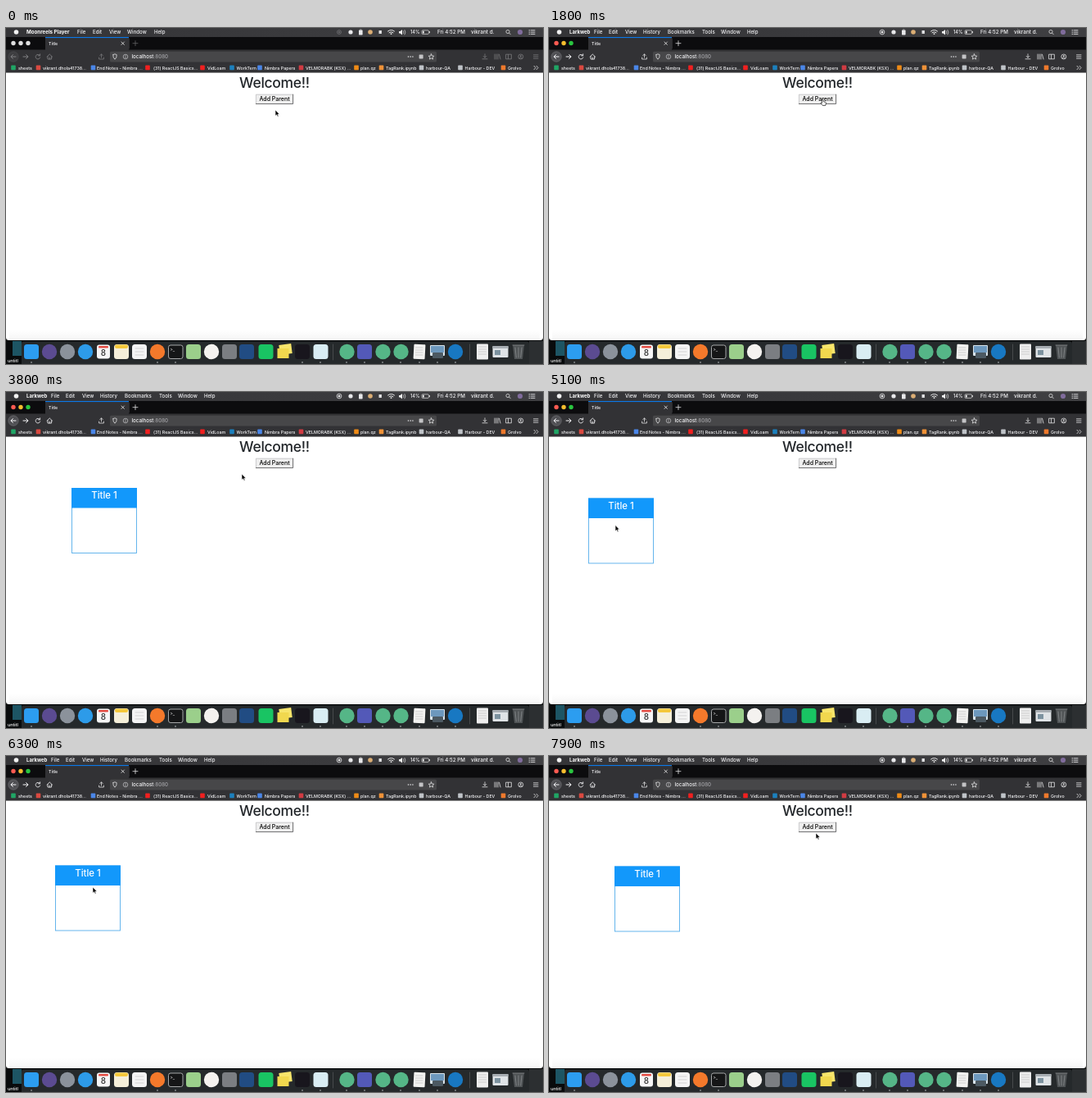
Recreate the animation shown at these times as an HTML page. Size 656x410 px, loop 8 s.

```html
<!DOCTYPE html>
<html lang="en">
<head>
<meta charset="utf-8">
<title>Title</title>
<style>
  html, body { margin: 0; width: 100%; height: 100%; overflow: hidden; background: #000; }
  svg { display: block; width: 100%; height: 100%; }
  text { font-family: Inter, "Open Sans", sans-serif; font-weight: 500; white-space: pre; }
</style>
</head>
<body>
<svg id="stage" viewBox="0 0 656 410"></svg>
<script>
const rect = (x, y, w, h, fill, r = 0, more = '') =>
  `<rect x="${x}" y="${y}" width="${w}" height="${h}" rx="${r}" fill="${fill}" ${more}/>`;
const circ = (x, y, r, fill, more = '') =>
  `<circle cx="${x}" cy="${y}" r="${r}" fill="${fill}" ${more}/>`;
const line = (d, color = '#e2e2e4', w = .8) =>
  `<path d="${d}" fill="none" stroke="${color}" stroke-width="${w}" stroke-linecap="round" stroke-linejoin="round"/>`;
const text = (x, y, s, size = 5.8, fill = '#f6f6f8', more = '') =>
  `<text x="${x}" y="${y}" font-size="${size}" fill="${fill}" ${more}>${s}</text>`;
const group = (id, body) => `<g id="${id}">${body}</g>`;
const fade = (id, from, to, dir) =>
  `<linearGradient id="${id}" ${dir}><stop stop-color="${from}"/><stop offset="1" stop-color="${to}"/></linearGradient>`;
const labels = list => list.map(([x, s]) => text(x, 7.2, s, 6.1)).join('');

const fades = fade('barFade', '#343437', '#3f3f42', 'x2="1"') +
  fade('pageFade', '#ffffff', '#f5f5f5', 'x2="0" y2="1"');

function menuBar() {
  const bold = 'style="font-weight:700"';
  return rect(0, 0, 656, 11, 'url(#barFade)') + circ(12.5, 5, 2.8, '#f2f2f2') +
    group('playerMenu', text(25, 7.2, 'Moonreels Player', 6.2, '#fff', bold) +
      labels([[87, 'File'], [106, 'Edit'], [126, 'View'], [148, 'Window'], [181, 'Help']]) +
      circ(407, 5, 2.4, 'none', 'stroke="#77777a" stroke-width=".8"') + circ(407, 5, .9, '#77777a')) +
    group('browserMenu', text(25, 7.2, 'Larkweb', 6, '#fff', bold) +
      labels([[55, 'File'], [73, 'Edit'], [93, 'View'], [115, 'History'], [145, 'Bookmarks'],
        [187, 'Tools'], [210, 'Window'], [242, 'Help']]) +
      circ(407, 5, 2.9, 'none', 'stroke="#e8e8ea" stroke-width=".8"') + rect(405.7, 3.7, 2.6, 2.6, '#e8e8ea', .3)) +
    circ(421, 5, 2.6, '#e8e8ea') +
    rect(431, 2.4, 4.6, 6, '#e8e8ea', .6) + rect(432, 1.6, 2.6, 1.5, '#aaa', .4) +
    circ(445, 5, 2.8, '#dcae74') + rect(455.5, 3, 3.4, 4, '#e0e0e2') +
    line('M466.5 4Q470.5 .8 474.5 4M468 5.7Q470.5 3.7 473 5.7', '#eee', 1) + circ(470.5, 7.2, .9, '#eee') +
    '<path d="M480 4H481.5L484 2V8.4L481.5 6.4H480Z" fill="#eee"/>' +
    line('M485.4 3.6Q486.5 5.2 485.4 6.8M487 2.4Q489 5.2 487 8', '#ddd', .7) +
    text(494, 7.2, '14%', 5.6) +
    rect(508, 2.8, 8.4, 4.6, 'none', 1, 'stroke="#ddd" stroke-width=".7"') +
    rect(509, 3.7, 1.7, 2.8, '#eee') + rect(517, 4, .9, 2.2, '#ddd') +
    text(527, 7.2, 'Fri 4:52 PM', 6.2) + text(568, 7.2, 'vikrant d.', 6.4) +
    circ(613, 4.5, 2.1, 'none', 'stroke="#ddd" stroke-width=".8"') + line('M614.6 6.1L616.3 7.8') +
    circ(628, 5, 3.1, '#806c9c') +
    line('M639 2.8H640M641.5 2.8H646M639 5.1H640M641.5 5.1H646M639 7.4H640M641.5 7.4H646', '#e6e6e8', .9);
}

function browser() {
  const lights = colors => colors.map((c, i) => circ(9 + 9 * i, 18.5, 2.7, c)).join('');
  let s = rect(0, 11, 656, 16, '#0c0c0e') + rect(0, 26.5, 656, 28, '#323235') +
    rect(48, 11.5, 102, 15.5, '#323235') + rect(48, 11, 102, 1.1, '#0a78e8') +
    group('idle', lights(['#dededf', '#dededf', '#dededf'])) +
    group('active', lights(['#ff5b52', '#f6bd2e', '#2ac640'])) +
    text(52, 20.5, 'Title', 5.4) + line('M141 17L144.4 20.4M144.4 17L141 20.4', '#eee', .8) +
    line('M150.5 13V25', '#4a4a4d', .5);

  // buttons that dim with the window
  s += group('tools', circ(9, 35, 6.2, '#515155', 'stroke="#727276" stroke-width=".6"') +
    line('M12 35H6.2M8.4 32.6L6 35L8.4 37.4M21 35H26.8M24.6 32.6L27 35L24.6 37.4', '#f6f6f8', 1) +
    line('M155 18.7H161M158 15.7V21.7') +
    line('M41.2 33.4A2.8 2.8 0 1 0 41.7 36M41.6 31.8V33.8H39.5M50 35.2L53.3 32L56.6 35.2M51 34.8V38H55.6V34.8M53.3 38V36', '#e8e8ea', .9) +
    line('M116.5 36V32M114.8 33.6L116.5 31.8L118.2 33.6M113.6 36V38H119.4V36') +
    line('M585 31.8V36M583.2 34.4L585 36.2L586.8 34.4M582 37.8H588') +
    line('M597 32V38M599 32V38M601 32V38M602.5 32.2L604 38') +
    line('M611 32.2H617.4V37.8H611ZM613.5 32.5V37.5') +
    circ(628.8, 35, 3, 'none', 'stroke="#e2e2e4" stroke-width=".8"') + circ(628.8, 34.2, 1, '#e2e2e4') +
    line('M627.2 36.7Q628.8 35.2 630.4 36.7M644.5 32.8H650M644.5 35H650M644.5 37.2H650'));

  // address field
  s += rect(127, 28.8, 399, 12.6, '#474749', 1.5) +
    line('M130.8 32.6L133 31.8L135.2 32.6Q135.5 36.5 133 38.2Q130.5 36.5 130.8 32.6') +
    circ(146, 35, 2.8, 'none', 'stroke="#c8c8ca" stroke-width=".7"') + line('M146 34.8V36.4M146 33.4V33.5', '#ccc', .7) +
    text(153.5, 37.1, 'localhost<tspan fill="#a2a2a6">:8080</tspan>', 6.2) +
    [491.5, 494.2, 496.9].map(x => circ(x, 35, .8, '#e6e6e8')).join('') +
    rect(504.6, 32.4, 5, 5, '#c4c4c6', .7) +
    line('M519.5 31.8L520.5 34L522.9 34.2L521.1 35.8L521.6 38.1L519.5 36.9L517.4 38.1L517.9 35.8L516.1 34.2L518.5 34Z');

  // bookmarks: icon x, icon colour, label x, label
  s += [
    [9, '#20a565', 15, 'sheets'], [39.5, '#d94940', 45, 'vikrant.dhola41738...'],
    [106.5, '#4a86e8', 111, 'End Notes - Nimbra ...'], [173, '#f02020', 180, '(31) ReactJS Basics...'],
    [240, '#f02020', 246, 'VidLoam'], [276, '#1c80bd', 281.5, 'WorkTern'],
    [310, '#4a86e8', 316, 'Nimbra Papers'], [360.5, '#d03b42', 366, 'VELMORABK (KSX) ...'],
    [428, '#ef8b16', 433, 'plan.qz'], [458.5, '#ef9238', 464, 'TagRank.ipynb'],
    [507.5, '#bfc3c8', 513, 'harbour-QA'], [555, '#bfc3c8', 560.5, 'Harbour - DEV'],
    [607.5, '#ee792c', 613, 'Grolvo']
  ].map(([ix, c, x, name]) => rect(ix - 2.8, 45.6, 5.6, 5.6, c, .8) + text(x, 50.6, name, 5.3)).join('');
  s += line('M645 46.3L647 48.5L645 50.7M648 46.3L650 48.5L648 50.7');

  // page
  s += '<path d="M0 54.5H656V377.5Q656 381 652.5 381H3.5Q0 381 0 377.5Z" fill="#fff"/>' +
    rect(4, 368, 648, 13, 'url(#pageFade)') +
    text(328, 73, 'Welcome!!', 17.5, '#212529', 'text-anchor="middle" letter-spacing="-.3"') +
    rect(305, 80.8, 46, 12.2, '#efefef') +
    line('M305.4 92.6V81.2H350.6', '#bcbcbe', .7) + line('M305.4 92.6H350.6V81.2', '#5e5e60', .9) +
    text(328, 89.4, 'Add Parent', 7, '#000', 'text-anchor="middle"');
  return s;
}

function dock() {
  const app = (x, c, round) => round ? circ(x, 395, 9.2, c) : rect(x - 9, 386, 18, 18, c, 3.5);
  const square = [[31, '#2c9df0'], [141, '#f5efd9'], [163, '#f4f4f4'], [229, '#9bcf8b'],
    [273, '#7b7e82'], [294, '#214c83'], [317.5, '#19c463'], [362, '#18161d'], [384.5, '#d9edf3'], [438, '#5359b8']];
  const round = [[53, '#5b4b91'], [75, '#8b929b'], [97, '#2d9be9'], [185, '#f4792b'], [251, '#f4f2ef'],
    [416.5, '#55b687'], [460.5, '#55b687'], [482.5, '#55b687'], [549, '#1878c2']];
  const running = [31, 185, 207, 362, 384, 416, 438, 460, 482, 505, 527, 549];
  return rect(0, 381, 656, 29, '#090b0c') + rect(8, 382, 11, 18, '#1d5564') + rect(639, 382, 17, 28, '#2c2f31') +
    rect(19, 382.5, 620, 30, '#25292b', 3) + text(2, 407.8, 'untitl', 5.4, '#fff') +
    square.map(a => app(...a)).join('') + round.map(a => app(...a, true)).join('') +
    rect(111, 386.5, 16, 17, '#f6f6f6', 3) +
    text(119, 400.2, '8', 10, '#333', 'text-anchor="middle"') + rect(113, 388, 12, 2.5, '#e34b42', 1) +
    rect(133, 386.5, 16, 4.5, '#f5c83b', 2) +
    [391, 395, 399].map(y => line(`M158 ${y}H168`, '#c4c4c6', .7)).join('') +
    rect(198.5, 387, 17.5, 16.5, '#151617', 2.5, 'stroke="#a5a7a8" stroke-width="1"') +
    text(200.5, 394, '&gt;_', 5, '#ddd') +
    rect(334, 386, 15, 12, '#f7e56b', 0, 'transform="rotate(-7 341 392)"') + rect(331.5, 391, 14, 12, '#f1d84e') +
    rect(498, 386, 14, 18, '#f2f2f0', 1, 'transform="rotate(3 505 395)"') +
    [390, 393, 396, 399].map(y => line(`M500.5 ${y}H509`, '#b7b7b7', .6)).join('') +
    rect(518, 387, 18, 13, '#d8e3ea', 1) + rect(519, 388, 16, 8, '#6d98bd') + rect(521, 396, 13, 7, '#4c5962', 1) +
    line('M399.5 386V405M566.5 386V405', '#56595b', .7) +
    rect(575, 385.5, 14, 19, '#eeeeee', 1) +
    [389, 392, 395, 398].map(y => line(`M577.5 ${y}H586.5`, '#b5b5b5', .6)).join('') +
    rect(594.5, 388, 19, 14, '#dfe3e6', 1) + rect(594.5, 388, 19, 3, '#a7adb2') + rect(597, 393, 7, 6, '#7c929f') +
    '<path d="M619 387H633L631 404H621Z" fill="#4f5355"/>' + line('M619 387H633M622 390L623.3 402M626 390V402M630 390L628.7 402', '#92979a', .7) +
    running.map(x => circ(x, 408, .8, '#c7c9ca')).join('');
}

const card = group('card', rect(.5, .5, 79, 79, '#fff', 0, 'stroke="#55aeea" stroke-width=".9"') +
  rect(0, 0, 80, 24.5, '#1298fb') +
  text(40, 13, 'Title 1', 11.4, '#fff', 'text-anchor="middle"'));

const pointer = group('arrow', '<path d="M0 0V7.3L1.7 5.8L2.8 8.2L4 7.7L2.9 5.3H5.1Z" fill="#000" stroke="#fff" stroke-width=".6"/>') +
  group('hand', '<path d="M-.7 .3Q.2 -.5 .8 .4L1.3 2.9L3.6 3.4Q4.5 3.7 4.4 4.8L3.8 7.6H.3L-2.2 4.7Q-1.9 3.8 -.5 4.6Z" fill="#fff" stroke="#111" stroke-width=".7"/>');

document.getElementById('stage').innerHTML =
  fades + menuBar() + browser() + dock() + card + group('cursor', pointer);

// [ms, x, y]; the card is shaken left and right while held
const cursorPath = [[0, 329, 100], [100, 329, 100], [700, 334, 87], [3200, 334, 87], [3800, 288, 100],
  [4300, 113, 150], [4400, 113, 150], [4850, 53, 158], [5350, 109, 167], [5800, 79, 167], [6050, 55, 158],
  [6300, 106, 160], [6800, 141, 137], [7100, 116, 158], [7400, 148, 168], [7900, 326, 94]];
const cardPath = [[0, 80, 117], [4400, 80, 117], [4850, 20, 125], [5350, 76, 134], [5800, 47, 134.5], [6050, 20, 125],
  [6300, 60, 133.5], [6800, 74, 107], [7100, 48, 125], [7400, 80, 134.5]];

function along(path, t) {
  const i = path.findIndex(p => p[0] > t);
  if (i < 0) return path[path.length - 1].slice(1);
  const [a, b] = [path[i - 1], path[i]];
  const u = (t - a[0]) / (b[0] - a[0]);
  const k = u * u * (3 - 2 * u);
  return [a[1] + (b[1] - a[1]) * k, a[2] + (b[2] - a[2]) * k];
}

const node = id => document.getElementById(id);
const show = (id, on) => node(id).setAttribute('visibility', on ? 'visible' : 'hidden');
const place = (id, p) => node(id).setAttribute('transform', `translate(${p})`);

function draw(now) {
  const t = Math.floor(now % 8000 / 100) * 100; // ten steps a second
  const focused = t >= 1700;
  const hand = t >= 500 && t < 3500 || t >= 6700 && t < 7400;
  show('playerMenu', !focused);
  show('idle', !focused);
  show('browserMenu', focused);
  show('active', focused);
  node('tools').setAttribute('opacity', focused ? 1 : .4);
  show('card', t >= 3200);
  show('hand', hand);
  show('arrow', !hand);
  place('card', along(cardPath, t));
  place('cursor', along(cursorPath, t));
}

const start = performance.now();
function loop() {
  draw(performance.now() - start);
  requestAnimationFrame(loop);
}
loop();
</script>
</body>
</html>
```
